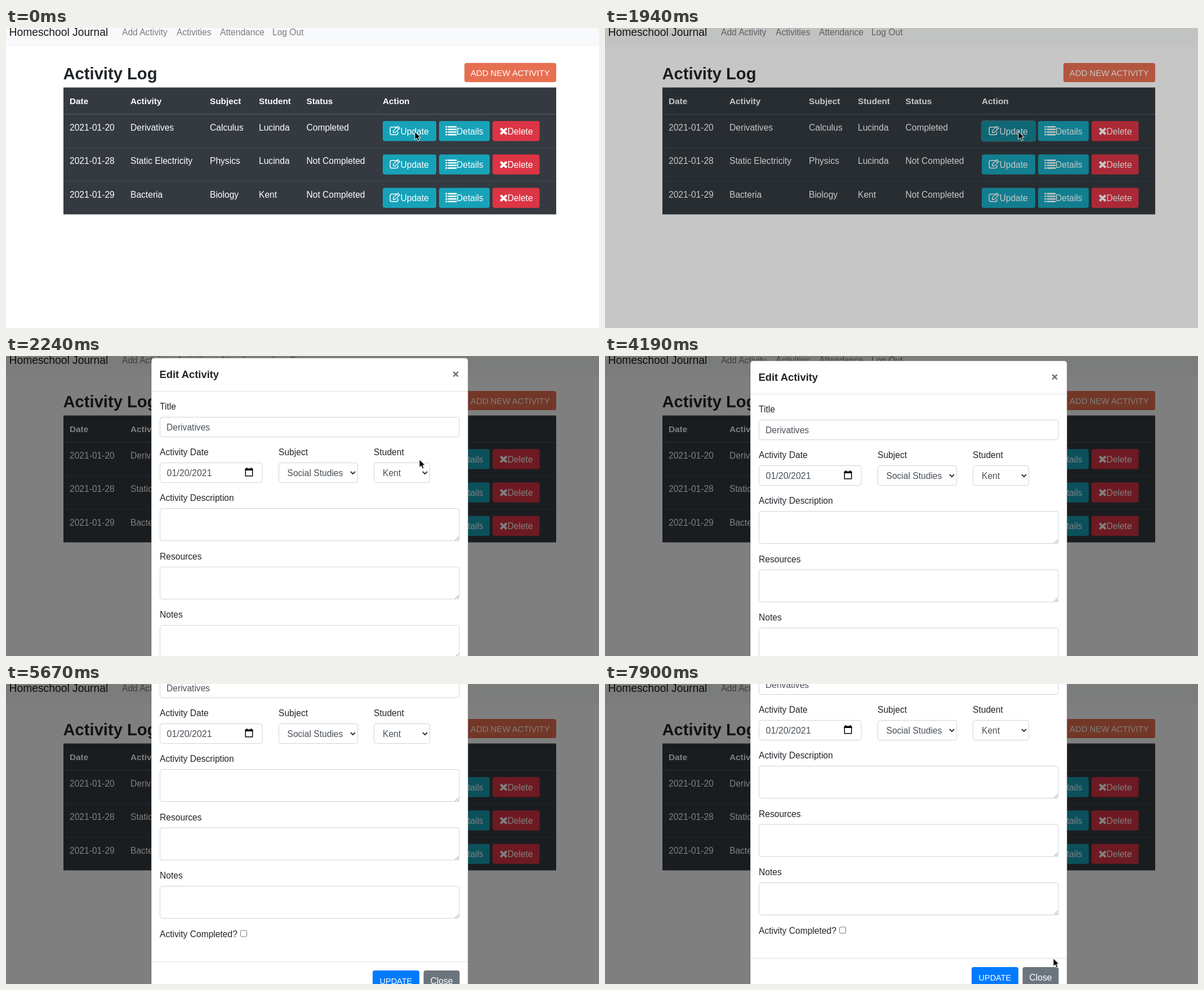
Animation of 1053x532 px, one loop 8 s. Source, as an HTML page:

```html
<!DOCTYPE html>
<html lang="en">
<head>
<meta charset="utf-8">
<title>Activity Log</title>
<style>
  html, body { margin: 0; width: 100%; height: 100%; overflow: hidden; background: #fff; }
  svg { display: block; width: 100%; height: 100%; }
  text { font: 15.6px "Liberation Sans", Arial, sans-serif; fill: #212529; white-space: pre; }
  .brand { font-size: 19.3px; fill: #1a1a1a; }
  .link { fill: #7c7c7d; }
  .h2 { font-size: 29.2px; font-weight: bold; }
  .h5 { font-size: 18.4px; font-weight: bold; }
  .th { font-size: 15.3px; font-weight: bold; fill: #fff; }
  .light { fill: #fff; }
  .caps { font-size: 14.9px; fill: #fff; }
  .caps.small { font-size: 14.5px; }
  .value { fill: #495057; }
  .date { font-size: 16px; }
  .field { fill: #fff; stroke: #ced4da; }
  .rule { fill: #dee2e6; }
  .line { fill: none; stroke: #fff; stroke-width: 1.5; stroke-linejoin: round; }

  #press, #ring, #backdrop, #modal, #scroll, #cursor { animation: 8s step-end infinite; }
  #press { animation-name: press; }
  #ring { animation-name: ring; }
  #backdrop { animation-name: dim; }
  #modal { animation-name: drop; }
  #scroll { animation-name: scroll; }
  #cursor { animation-name: point; }

  @keyframes press { 0% { fill: #17a2b8; } 16.875%, 100% { fill: #138496; } }
  @keyframes ring { 0% { opacity: 0; } 24.25%, 100% { opacity: 1; } }
  @keyframes dim { 0% { opacity: 0; } 24.25% { opacity: .224; } 26.125%, 100% { opacity: .5; } }
  @keyframes drop {
    0% { opacity: 0; transform: translateY(-50px); }
    26.125% { opacity: .45; transform: translateY(-32px); }
    28% { opacity: 1; transform: translateY(-5px); }
    29.875%, 100% { opacity: 1; transform: none; }
  }
  @keyframes scroll {
    0% { transform: none; }
    57.875% { transform: translateY(-5px); }
    59.75% { transform: translateY(-18px); }
    61.625% { transform: translateY(-37px); }
    63.5% { transform: translateY(-56.5px); }
    65.375% { transform: translateY(-78px); }
    67.25% { transform: translateY(-98px); }
    69% { transform: translateY(-114px); }
    70.875% { transform: translateY(-124px); }
    72.625% { transform: translateY(-129px); }
    82%, 100% { transform: translateY(-130px); }
  }
  @keyframes point {
    0% { transform: translate(726px, 184px); }
    15% { transform: translate(729px, 184px); }
    16.875% { transform: translate(732px, 184px); }
    18.75% { transform: translate(734px, 183.5px); }
    41.125% { transform: translate(742px, 185px); }
    43% { transform: translate(768px, 189px); }
    44.875% { transform: translate(815px, 197px); }
    46.75% { transform: translate(880px, 207px); }
    48.625% { transform: translate(955px, 217px); }
    50.5% { transform: translate(1025px, 225px); }
    52.375% { transform: translate(1100px, 230px); }
    93.25% { transform: translate(814px, 356px); }
    95.125% { transform: translate(809px, 402px); }
    97% { transform: translate(801px, 455px); }
    98.75%, 100% { transform: translate(796px, 486.5px); }
  }
</style>
</head>
<body>
<svg viewBox="0 0 1053 532" preserveAspectRatio="none">
  <defs>
    <g id="edit">
      <path class="line" d="M694 175.8H685a2.8 2.8 0 0 0-2.8 2.8v7.8a2.8 2.8 0 0 0 2.8 2.8h8a2.8 2.8 0 0 0 2.8-2.8V184"/>
      <path class="line" style="stroke-width:1.3" d="M687.8 185.3v-3.4l8.2-7.7 3.4 3.3-8.2 7.8zM694 176l3.3 3.4"/>
      <path fill="#fff" d="M687.3 185.8v-3.2l3.2 3.2z"/>
    </g>
    <g id="list" stroke="#fff" stroke-width="2.6">
      <path d="M780.5 175.3h3m1.3 0h15.4M780.5 179.9h3m1.3 0h15.4M780.5 184.5h3m1.3 0h15.4M780.5 189.1h3m1.3 0h15.4"/>
    </g>
    <path id="times" d="M878.3 178l10.6 10.2m0-10.2l-10.6 10.2" stroke="#fff" stroke-width="4"/>
    <path id="grip" d="M-8 -1.5L-1.5 -8M-4 -1.5L-1.5 -4" fill="none" stroke="#777" stroke-width=".9"/>
    <path id="chevron" d="M-4-2l4 4 4-4" fill="none" stroke="#343a40" stroke-width="2"/>
  </defs>
  <g id="page"></g>
  <rect id="backdrop" width="1053" height="532"/>
  <g id="modal"><g id="scroll"></g></g>
  <path id="cursor" d="M0 0V14.2l3.3-3 2.3 5.2 2.6-1.1-2.3-5.1h4.4z" stroke="#fff" stroke-width="1"/>
</svg>
<script>
  const text = (x, y, s, cls = "") => `<text x="${x}" y="${y}" class="${cls}">${s}</text>`;
  const box = (x, y, w, h, fill, r = 3.8, id = "") =>
    `<rect ${id && `id="${id}"`} x="${x}" y="${y}" width="${w}" height="${h}" rx="${r}" fill="${fill}"/>`;
  const field = (x, y, w, h = 35) =>
    `<rect class="field" x="${x + .5}" y="${y + .5}" width="${w - 1}" height="${h}" rx="3.8"/>`;
  const use = (id, x = 0, y = 0) => `<use href="#${id}" x="${x}" y="${y}"/>`;

  const columns = [113, 221, 362, 449, 533.5, 669];
  const heads = ["Date", "Activity", "Subject", "Student", "Status", "Action"];
  const rows = [
    ["2021-01-20", "Derivatives", "Calculus", "Lucinda", "Completed"],
    ["2021-01-28", "Static Electricity", "Physics", "Lucinda", "Not Completed"],
    ["2021-01-29", "Bacteria", "Biology", "Kent", "Not Completed"]
  ];

  const buttons = first =>
    box(669, 165, 95, 35.5, "#17a2b8", 3.8, first ? "press" : "") +
    (first ? `<rect id="ring" x="668.5" y="164.5" width="96" height="36.5" rx="4.3" fill="none" stroke="#3f7581" stroke-width="1.6"/>` : "") +
    box(769, 165, 90, 35.5, "#17a2b8") + box(864, 165, 83.5, 35.5, "#dc3545") +
    use("edit") + use("list") + use("times") +
    text(700.5, 188.5, "Update", "light") + text(800, 188.5, "Details", "light") +
    text(890.5, 188.5, "Delete", "light");

  const row = (cells, i) => `<g transform="translate(0 ${i * 59.3})">` +
    (i ? box(102, 152.5, 875, 1, "#454d55", 0) : "") +
    cells.map((s, c) => text(columns[c], 182, s, "light")).join("") + buttons(!i) + "</g>";

  document.getElementById("page").innerHTML =
    box(0, 0, 1053, 33.5, "#f8f9fa", 0) +
    text(5.5, 14, "Homeschool Journal", "brand") +
    [[206, "Add Activity"], [303, "Activities"], [380, "Attendance"], [473, "Log Out"]]
      .map(([x, s]) => text(x, 13, s, "link")).join("") +
    text(101.5, 91, "Activity Log", "h2") +
    box(814, 62, 163, 34, "#e76f51") + text(825, 84.5, "ADD NEW ACTIVITY", "caps") +
    box(102, 105.5, 875, 225, "#343a40", 0) + box(102, 152, 875, 2, "#454d55", 0) +
    heads.map((s, c) => text(columns[c], 135, s, "th")).join("") +
    rows.map(row).join("");

  const area = (label, y) =>
    text(273, y, label) + field(273, y + 13, 532.5, 57) + use("grip", 805.5, y + 71.5);

  document.getElementById("scroll").innerHTML =
    `<rect x="258" y="8.5" width="562.5" height="675" rx="5" fill="#fff" stroke="#000" stroke-opacity=".25"/>` +
    text(272.5, 44, "Edit Activity", "h5") +
    `<path d="M794.3 33l8.4 8.4m0-8.4l-8.4 8.4" stroke="#777" stroke-width="2.7"/>` +
    `<rect class="rule" x="258.5" y="67" width="561.5" height="1"/>` +
    text(273, 100, "Title") + field(273, 113, 532.5) + text(285, 136.5, "Derivatives", "value") +
    text(273, 181, "Activity Date") + field(273, 194, 182.5) + text(285.5, 217.5, "01/20/2021", "value date") +
    `<path d="M425.3 206.5h12.4v11.2h-12.4z" fill="none" stroke="#000" stroke-width="1.5"/>` +
    `<path d="M424.6 204.6h13.8v3.4h-13.8zM426.6 203h2v2h-2zM434.4 203h2v2h-2z"/>` +
    text(484, 181, "Subject") + field(484, 194, 141) + text(499.5, 217.5, "Social Studies", "value") +
    use("chevron", 616, 212) +
    text(653, 181, "Student") + field(653, 194, 100) + text(669, 217.5, "Kent", "value") +
    use("chevron", 744, 212) +
    area("Activity Description", 262) + area("Resources", 365.5) + area("Notes", 469) +
    text(273, 572.5, "Activity Completed?") +
    `<rect x="416.5" y="561" width="11" height="11" rx="2" fill="#fff" stroke="#767676"/>` +
    `<rect class="rule" x="258.5" y="616" width="561.5" height="1"/>` +
    box(651, 632, 83, 35.5, "#007bff") + text(663.5, 655.5, "UPDATE", "caps small") +
    box(741.5, 632, 64, 35.5, "#6c757d") + text(753.5, 655.5, "Close", "light");
</script>
</body>
</html>
```
